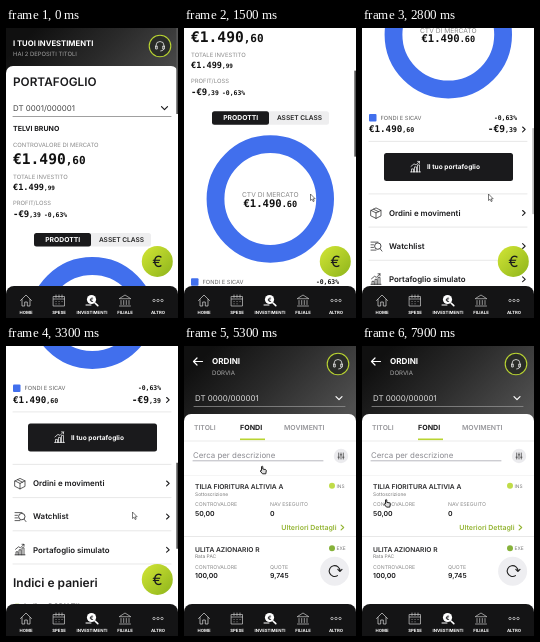
An HTML page for the animation above (8000 ms loop, 172 px wide and 290 px high).

```html
<!DOCTYPE html>
<html lang="it">
<head>
<meta charset="utf-8">
<title>Portafoglio</title>
<style>
html, body { margin: 0; width: 100%; height: 100%; overflow: hidden; background: #fff; }
svg { display: block; width: 172px; height: 290px; font-family: Inter, "Open Sans", sans-serif; text-rendering: geometricPrecision; }
.mono { font-family: "DejaVu Sans Mono", monospace; font-weight: 700; fill: #111; }
.line { fill: none; stroke-linecap: round; stroke-linejoin: round; }
</style>
</head>
<body>
<svg id="stage" viewBox="0 0 172 290"></svg>
<script>
const INK = '#1a1a1c', GREY = '#8b8b8b', LIME = '#b9d432', BLUE = '#416fed';

// Drawing helpers
const text = (x, y, size, weight, fill, label, anchor = 'start') =>
  `<text x="${x}" y="${y}" font-size="${size}" font-weight="${weight}" fill="${fill}" text-anchor="${anchor}">${label}</text>`;
const money = (x, y, big, small, whole, cents, anchor = 'start') =>
  `<text class="mono" x="${x}" y="${y}" font-size="${big}" text-anchor="${anchor}">${whole}<tspan font-size="${small}">${cents}</tspan></text>`;
const line = (d, color, width = 0.8) =>
  `<path class="line" d="${d}" stroke="${color}" stroke-width="${width}"/>`;
const rect = (x, y, w, h, fill, r = 0) =>
  `<rect x="${x}" y="${y}" width="${w}" height="${h}" rx="${r}" fill="${fill}"/>`;
const disc = (x, y, r, fill, extra = '') =>
  `<circle cx="${x}" cy="${y}" r="${r}" fill="${fill}" ${extra}/>`;
const place = (x, y, body) => `<g transform="translate(${x} ${y})">${body}</g>`;
const rule = (y, color = '#dedede', x1 = 7, x2 = 165) => line(`M${x1} ${y}H${x2}`, color, 0.7);
const next = (x, y, color = INK) => line(`M${x - 1.4} ${y - 2.4}l2.6 2.4l-2.6 2.4`, color, 1.1);
const down = (x, y, color) => line(`M${x - 3} ${y - 1.4}l3 3l3-3`, color, 1.2);

const header = h => rect(0, 0, 172, h, 'url(#shade)');
const headset = place(154, 18, disc(0, 0, 10.8, '#2a2c28', `stroke="${LIME}" stroke-width="1.1"`) +
  line('M-4 1v-1.500a4 4 0 0 1 8 0v1.500M-4 0h1.300v3h-1.300zM4 0h-1.300v3h1.300zM3.700 3.200q-.4 1.800-3 1.800', '#fff', 0.7));

const chartIcon = color =>
  line('M-5 5H5M-4 5v-3h2v3M-1 5V0h2v5M2 5v-7h2v7M-4.500-.5l3-2.500l2 1l3.500-3.500M2-5.500h2v2', color, 0.7);
const boxIcon = line('M-5-2.500L0-5L5-2.500V3L0 5.500L-5 3zM-5-2.500L0 0L5-2.500M0 0V5.500M-2.500-3.700L2.500-1.200', INK, 0.7);
const watchIcon = line('M-5-4H2M-5-1.300h2.500M-5 1.300h2.500M-5 4H0M4 2.500l2 2.500', INK, 0.7) +
  disc(1.8, 0, 3.2, '#fff', `stroke="${INK}" stroke-width=".8"`);

const portfolio = () => {
  const rows = [['Ordini e movimenti', boxIcon], ['Watchlist', watchIcon], ['Portafoglio simulato', chartIcon(INK)]];
  return header(60) +
    text(7, 17.5, 7.7, 700, '#fff', 'I TUOI INVESTIMENTI') +
    text(7, 28, 5.9, 400, '#a0a0a0', 'HAI 2 DEPOSITI TITOLI') + headset +
    rect(0, 38, 172, 680, '#fff', 7) +
    text(7, 58, 11.8, 600, INK, 'PORTAFOGLIO') +
    text(7, 83, 7.9, 400, '#444', 'DT 0001/000001') + down(158.5, 80, INK) + rule(88.5, '#777') +
    text(7, 102.5, 7, 700, INK, 'TELVI BRUNO') +
    text(7, 118.5, 5.9, 400, GREY, 'CONTROVALORE DI MERCATO') +
    money(7, 136, 14.6, 11, '€1.490', ',60') +
    text(7, 150.5, 5.9, 400, GREY, 'TOTALE INVESTITO') +
    money(7, 161.5, 8.6, 6, '€1.499', ',99') +
    text(7, 177, 5.9, 400, GREY, 'PROFIT/LOSS') +
    money(7, 188.5, 9, 6.4, '-€9', ',39') + money(38, 188.5, 6.4, 6.4, '-0,63%', '') +
    rect(28, 205, 117, 13.5, '#eeeeef', 2.5) + rect(28, 205, 57, 13.5, INK, 2.5) +
    text(56.7, 214.2, 6.8, 700, '#fff', 'PRODOTTI', 'middle') +
    text(115.5, 214.2, 6.6, 600, '#222', 'ASSET CLASS', 'middle') +
    disc(86.3, 292.8, 54.8, 'none', `stroke="${BLUE}" stroke-width="17.800"`) +
    text(86.3, 291, 6.7, 400, GREY, 'CTV DI MERCATO', 'middle') +
    money(86.3, 300.5, 10.6, 8.6, '€1.490', '.60', 'middle') +
    rect(7, 372, 7.5, 7.5, BLUE, 1) +
    text(18.5, 378, 5.7, 400, '#666', 'FONDI E SICAV') +
    money(155, 378, 6.4, 6.4, '-0,63%', '', 'end') +
    money(7, 390.5, 9.2, 6.6, '€1.490', ',60') +
    money(155, 390.5, 9.6, 6.6, '-€9', ',39', 'end') + next(162, 387.5) + rule(399.5) +
    rect(22, 411, 129, 28, INK, 2.5) + place(53.5, 425, chartIcon('#fff')) +
    text(65, 427.5, 6.6, 700, '#fff', 'Il tuo portafoglio') +
    rows.map(([label, icon], i) => {
      const y = 471 + 33.2 * i;
      return rule(y - 19) + place(14, y, icon) + text(27, y + 2.8, 7.9, 600, INK, label) + next(162, y);
    }).join('') + rule(551.6) +
    text(7, 575, 12, 600, INK, 'Indici e panieri') +
    line('M8.500 596.500l4.500-4.500M9.500 592h3.500v3.500', '#86ad1c', 1.2) +
    text(18, 596.5, 7.4, 600, INK, 'Italia - BORX TIL');
};

const order = (y, name, kind, state, dot, value, label, amount) =>
  text(11, y, 6.7, 600, '#2a2a2c', name) +
  text(11, y + 6.7, 4.9, 400, '#777', kind) +
  disc(148, y - 3.2, 3, dot) + text(152.5, y - 1.4, 4.8, 400, '#777', state) +
  text(11, y + 17, 5.2, 400, GREY, 'CONTROVALORE') + text(86, y + 17, 5.2, 400, GREY, label) +
  text(11, y + 26.5, 6.9, 600, INK, value) + text(86, y + 26.5, 6.9, 600, INK, amount);

const orders = () => rect(0, 0, 172, 290, '#fff') + header(80) +
  line('M18.500 15.500H9.500M13 12l-3.500 3.500l3.500 3.500', '#fff', 1.2) +
  text(28, 18, 8.1, 700, '#fff', 'ORDINI') +
  text(28, 28.5, 6.1, 400, '#a8a8a8', 'DORVIA') + headset +
  text(11, 55, 7.9, 400, '#ddd', 'DT 0000/000001') + down(155, 52, '#fff') + rule(60.5, '#999', 10, 161) +
  rect(0, 68, 172, 240, '#fff', 7) +
  text(10, 83.5, 6.8, 600, '#96969a', 'TITOLI') +
  text(56, 83.5, 7.1, 700, INK, 'FONDI') +
  text(100, 83.5, 6.9, 600, '#96969a', 'MOVIMENTI') +
  rule(95, '#e2e2e2', 0, 172) + rect(56, 92.5, 25, 1.6, LIME) +
  text(9, 112, 7.9, 400, '#8c8c92', 'Cerca per descrizione') + rule(114.8, '#9a9aa4', 9, 139) +
  disc(157, 110, 7.2, '#ebebee') +
  line('M154.700 107v6M157 107v6M159.300 107v6M154 111.200h1.400M156.300 108.800h1.400M158.600 111.200h1.400', '#333', 0.7) +
  rule(129.5, '#f1f1f1', 0, 172) +
  order(143, 'TILIA FIORITURA ALTIVIA A', 'Sottoscrizione', 'INS', '#c0dc48', '50,00', 'NAV ESEGUITO', '0') +
  text(152.5, 184, 7, 600, '#93b432', 'Ulteriori Dettagli', 'end') + next(158.5, 181.5, '#93b432') +
  rule(190.5, '#dedede', 0, 172) +
  order(205.5, 'ULITA AZIONARIO R', 'Rata PAC', 'EXE', '#86b23a', '100,00', 'QUOTE', '9,745') +
  disc(150.6, 225.2, 14.5, '#eeeef1') +
  line('M153.500 229.600a5.400 5.400 0 1 1 2.500-4.600M153.800 223.300l2.200 2.200l2-2.200', '#222', 1.1);

const nav = () => {
  const bank = 'M-5.500-2L0-5.500L5.500-2zM-4 0v4M-1.300 0v4M1.300 0v4M4 0v4M-5.500 5.500h11';
  const items = [
    ['HOME', line('M-5.500 0L0-5.500L5.500 0M-4-1v6.500h2.700v-4h2.600v4h2.700V-1', '#ddd', 0.7)],
    ['SPESE', line('M-5.500-4h11v9.500h-11zM-5.500-1.500h11M-3-5.500v2.500M0-5.500v2.500M3-5.500v2.500M-3 1h.1M0 1h.1M3 1h.1M-3 3.300h.1M0 3.300h.1', '#ccc', 0.7)],
    ['INVESTIMENTI', disc(-0.5, -1, 4.6, '#fff') + line('M3 2.500l2.800 2.600', '#fff', 1.6) +
      text(-0.5, 1.2, 6, 700, INK, '€', 'middle') + line('M-6 4.500h5', '#fff', 1)],
    ['FILIALE', line(bank, '#ccc', 0.7)],
    ['ALTRO', [-4, 0, 4].map(x => disc(x, 0, 1.2, 'none', 'stroke="#ddd" stroke-width=".7"')).join('')]
  ];
  return rect(0, 258, 172, 42, '#141415', 8) + items.map(([label, icon], i) =>
    place(20 + 33 * i, 272.5, icon + text(0, 13, 4.3, 700, '#fff', label, 'middle'))).join('');
};

const stage = document.getElementById('stage');
stage.innerHTML = `
<defs>
  <linearGradient id="shade" gradientUnits="userSpaceOnUse" x1="30" y1="0" x2="130" y2="100">
    <stop stop-color="#101010"/><stop offset=".45" stop-color="#2a2a2a"/><stop offset="1" stop-color="#505050"/>
  </linearGradient>
  <linearGradient id="lime" x1="0" y1="0" x2="1" y2="1"><stop stop-color="#d3e636"/><stop offset="1" stop-color="#8db41b"/></linearGradient>
</defs>
<g id="page">${portfolio()}</g>
<rect id="thumb" x="170.300" width="1.700" height="86" fill="#555"/>
${disc(151.3, 233.4, 15.5, 'url(#lime)')}${text(151.3, 239, 15.5, 400, INK, '€', 'middle')}
<g id="orders">${orders()}</g>
${nav()}
<circle id="ripple" cx="75.500" cy="120" fill="#62c6d8" fill-opacity=".4" stroke="#42b7cc" stroke-width="1.500"/>
<g id="cursor" stroke-linejoin="round">
  <path id="arrow" d="M0 0V6.500L1.600 5.200L2.700 7.600L3.700 7.100L2.700 4.800H4.700z" fill="#fff" stroke="#222" stroke-width=".6"/>
  <path id="hand" d="M1.500 4.500V.6q.7-.8 1.300 0V3l3 .7q.6.3.5 1L5.800 7.800H2.500L.2 5q.3-.9 1.300-.5z" fill="#ddd" stroke="#111" stroke-width=".9"/>
</g>`;

// Key lists hold [time, value...] and are joined by straight segments
const scrollKeys = [[930, 0], [1000, 10], [1100, 32], [1600, 144], [1700, 150], [1850, 150], [2100, 191],
  [2400, 272], [2500, 278], [2740, 278], [2800, 286], [3400, 343], [3600, 349], [3680, 349], [3900, 353]];
const thumbKeys = [[2500, 1], [2750, 0.2], [2950, 1], [3350, 1], [3600, 0]];
const cursorKeys = [[500, 150, 159], [800, 126.5, 166], [3700, 126.5, 166], [4500, 76, 120], [6450, 76, 120],
  [6800, 68, 125.3], [7000, 50, 136], [7300, 27, 148], [7350, 27, 148], [7900, 22, 153.3]];

function at(keys, t) {
  const i = keys.findIndex(key => key[0] > t);
  if (i < 1) return keys.at(i).slice(1);
  const [a, b] = [keys[i - 1], keys[i]];
  const p = (t - a[0]) / (b[0] - a[0]);
  return a.slice(1).map((v, k) => v + (b[k + 1] - v) * p);
}
const clamp = v => Math.max(0, Math.min(1, v));
const set = (id, name, value) => document.getElementById(id).setAttribute(name, value);
const show = (id, on) => set(id, 'visibility', on ? 'inherit' : 'hidden');

function draw() {
  const t = performance.now() % 8000;
  const [scroll] = at(scrollKeys, t);
  const [x, y] = at(cursorKeys, t);
  const pointing = (t >= 4400 && t < 5500) || t >= 7350;
  const press = clamp((t - 4580) / 220);
  set('page', 'transform', `translate(0 ${-scroll})`);
  set('thumb', 'y', scroll * 0.35);
  set('thumb', 'opacity', at(thumbKeys, t)[0]);
  set('orders', 'opacity', clamp((t - 4950) / 250));
  set('cursor', 'transform', `translate(${x} ${y})`);
  show('cursor', t >= 500);
  show('arrow', !pointing);
  show('hand', pointing);
  set('ripple', 'r', 3 + 4.8 * press);
  set('ripple', 'opacity', press * clamp((5000 - t) / 180));
  requestAnimationFrame(draw);
}
draw();
</script>
</body>
</html>
```
